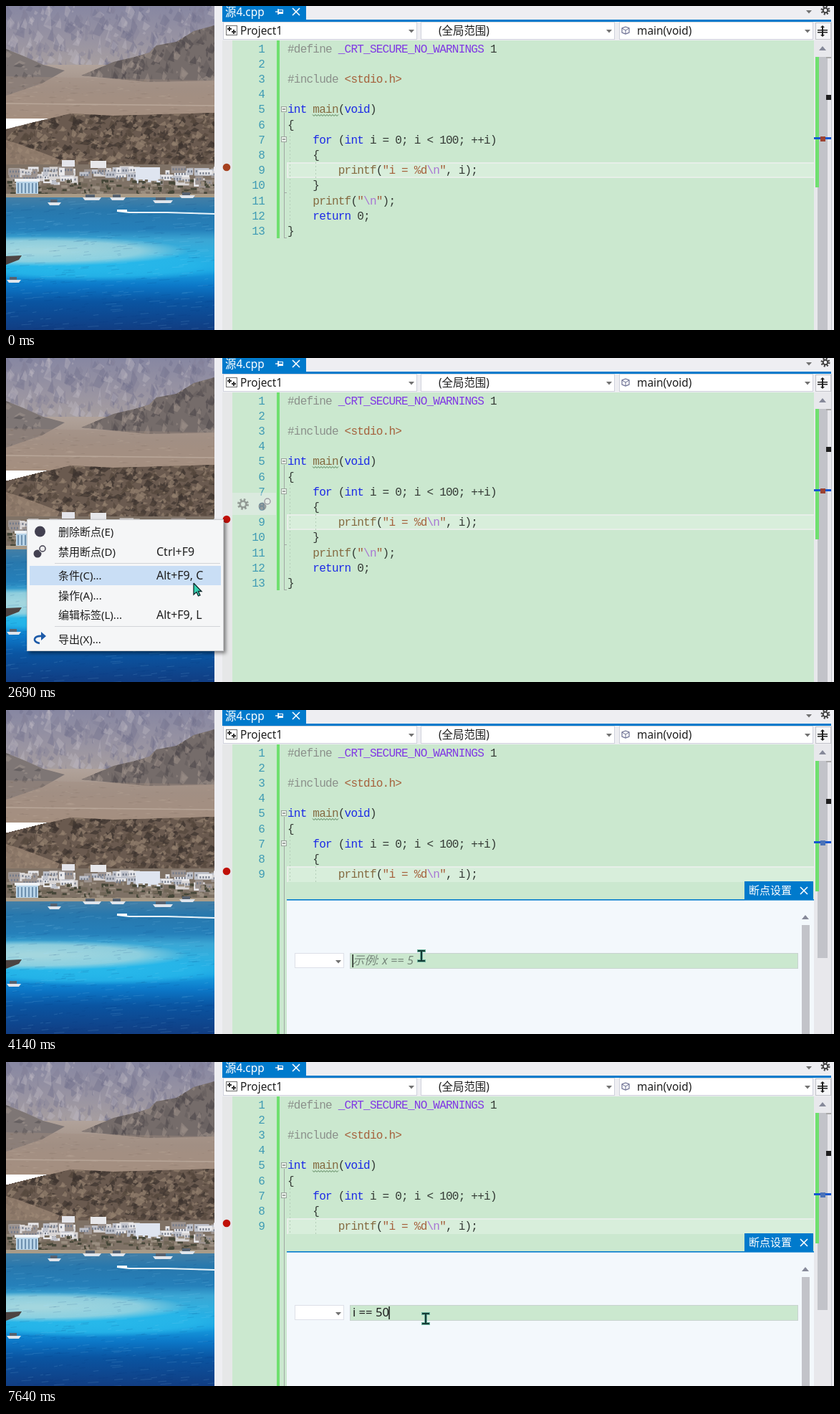
An HTML page with a canvas that plays this animation: 1156 px wide and 452 px high, repeating every 8000 ms.

```html
<!DOCTYPE html>
<html lang="zh">
<head>
<meta charset="utf-8">
<style>
html, body { margin: 0; width: 1156px; height: 452px; overflow: hidden; }
canvas { display: block; }
</style>
</head>
<body>
<canvas id="stage" width="1156" height="452"></canvas>
<script>
const stage = document.getElementById('stage');
let c = stage.getContext('2d');
const UI = '"Noto Sans", "Noto Sans CJK SC", sans-serif';
const MONO = '"Liberation Mono", monospace';
const BLUE = '#007acc', CHROME = '#eeeef2', GREEN = '#cbe8cf', LIT = '#d8eedb', INK = '#1e1e1e', THUMB = '#c2c3c9';
const GUIDE = '#b5cdb9';
const COL = 8.84, ROW = 21.2, LOOP = 8000;

const clamp = v => Math.max(0, Math.min(1, v));
function rect(x, y, w, h, fill) { c.fillStyle = fill; c.fillRect(x, y, w, h); }
function frame(x, y, w, h, stroke) { c.strokeStyle = stroke; c.lineWidth = 1; c.strokeRect(x + .5, y + .5, w - 1, h - 1); }
function dot(x, y, r, fill) { c.fillStyle = fill; c.beginPath(); c.arc(x, y, r, 0, 7); c.fill(); }
function path(points) {
  c.beginPath();
  for (let i = 0; i < points.length; i += 2) c.lineTo(points[i], points[i + 1]);
}
function poly(points, fill) { path(points); c.closePath(); c.fillStyle = fill; c.fill(); }
function line(points, stroke, width = 1, dash = []) {
  path(points);
  c.setLineDash(dash); c.strokeStyle = stroke; c.lineWidth = width; c.stroke(); c.setLineDash([]);
}
function text(str, x, middle, size = 15.4, fill = INK, style = '') {
  c.font = `${style} ${size}px ${UI}`;
  c.fillStyle = fill;
  c.fillText(str, x, middle + 5.5);
}
function down(x, y, fill = '#717171') { poly([x - 4, y - 2, x + 4, y - 2, x, y + 2.5], fill); }
function up(x, y) { poly([x - 5, y + 3, x + 5, y + 3, x, y - 3], '#868999'); }
function cross(x, y) {
  line([x - 5, y - 5, x + 5, y + 5], '#fff', 1.6);
  line([x - 5, y + 5, x + 5, y - 5], '#fff', 1.6);
}
function gear(x, y, r) {
  const ring = (radius, width, dash) => {
    c.beginPath(); c.arc(x, y, radius, 0, Math.PI * 2);
    c.setLineDash(dash); c.strokeStyle = '#424242'; c.lineWidth = width; c.stroke(); c.setLineDash([]);
  };
  ring(r, 3, [r * Math.PI / 8]);
  ring(r * .65, r * .4, []);
}
function disableIcon(x, y) {
  dot(x - 3, y + 3, 5.5, '#424050');
  dot(x + 4, y - 4, 5.5, '#f0f0f0');
  c.strokeStyle = '#424050'; c.lineWidth = 1.5;
  c.beginPath(); c.arc(x + 4, y - 4, 4, 0, 7); c.stroke();
}

// Coastal view, painted once
function paintPhoto() {
  const photo = document.createElement('canvas');
  photo.width = 291; photo.height = 452;
  const main = c;
  c = photo.getContext('2d');
  let seed = 7;
  const rnd = () => (seed = seed * 16807 % 2147483647) / 2147483647;
  const shade = (y0, y1, stops) => {
    const g = c.createLinearGradient(0, y0, 0, y1);
    stops.forEach(([y, color]) => g.addColorStop((y - y0) / (y1 - y0), color));
    return g;
  };
  // Filled outline covered with small slanted facets
  const rock = (points, fill, n, tones, steep) => {
    poly(points, fill);
    c.save(); path(points); c.clip();
    const ys = points.filter((_, i) => i % 2), top = Math.min(...ys), height = Math.max(...ys) - top;
    for (let i = 0; i < n; i++) {
      const x = rnd() * 300, y = top - 5 + rnd() * height, l = 3 + rnd() * 8, h = l * steep * (.6 + rnd());
      poly([x, y, x - l * rnd(), y + h * .8, x + l * .2, y + h, x + l * rnd(), y + h * .5], tones[i % tones.length]);
    }
    c.restore();
  };
  rock([0, 0, 291, 0, 291, 95, 0, 95], shade(0, 95, [[0, '#8787a2'], [50, '#9994a2'], [95, '#aca29f']]), 420,
    ['#6a6a8655', '#bcb6c066', '#807f9655'], 1.6);
  rect(0, 82, 291, 75, shade(82, 157, [[82, '#b1a39b'], [115, '#a29186'], [157, '#a8907f']]));
  rock([105, 97, 150, 78, 180, 71, 200, 65, 210, 55, 238, 50, 262, 35, 291, 27, 291, 104, 200, 106], '#756c6a', 380,
    ['#4b464988', '#9d918a88', '#645c5c88'], 1.4);
  rock([0, 60, 25, 70, 52, 82, 82, 90, 50, 108, 0, 125], '#7e7675', 150, ['#524d5188', '#9f958f88'], .9);
  rock([0, 98, 291, 104, 291, 157, 0, 157], '#a08d8066', 200, ['#bcaa9c55', '#83746755'], .15);
  line([0, 136, 291, 139], '#c3b3a6aa', 1.5);
  rock([0, 172, 40, 162, 90, 150, 150, 153, 291, 149, 291, 224, 0, 224], '#6a5a4f', 700,
    ['#3b322daa', '#95816faa', '#55473daa'], .8);
  poly([0, 187, 20, 193, 75, 214, 70, 224, 0, 224], '#a38c7aaa');
  rect(0, 221, 291, 47, '#7f7266');
  for (let i = 0; i < 70; i++) {
    const x = rnd() * 290, y = 223 + rnd() * 20, w = 5 + rnd() * 18, h = 5 + rnd() * 9;
    rect(x, y, w, h, ['#e9e9ec', '#bfc2cb', '#d8d5d5', '#9d9490'][i % 4]);
    for (let k = 2; k < w - 2; k += 4) rect(x + k, y + 3, 2, 3, '#747b8a');
  }
  rect(78, 215, 18, 9, '#e4e5eb'); rect(118, 216, 22, 10, '#e7e7ea'); rect(181, 225, 34, 22, '#dfe5f0');
  for (let i = 0; i < 230; i++) rect(rnd() * 291, 240 + rnd() * 23, 2 + rnd() * 7, 2 + rnd() * 3, ['#454638', '#706657', '#9a8e80'][i % 3]);
  rect(14, 243, 31, 21, '#b9d4e8'); rect(12, 241, 35, 4, '#eef2f6');
  for (let x = 16; x < 45; x += 5) rect(x, 247, 2, 14, '#6f91af');
  rect(0, 262, 291, 5, '#a99b88');

  rect(0, 267, 291, 185, shade(267, 452, [[267, '#447fa6'], [285, '#2878ad'], [312, '#2580ba'], [326, '#3ba6d4'],
    [345, '#2fb0e0'], [370, '#179ee0'], [390, '#0c78c8'], [412, '#0a55a2'], [452, '#113d82']]));
  const haze = (x, y, rx, ry, color) => {
    c.save(); c.translate(x, y); c.scale(rx, ry);
    const g = c.createRadialGradient(0, 0, .1, 0, 0, 1);
    g.addColorStop(0, color); g.addColorStop(.65, color + 'cc'); g.addColorStop(1, color + '00');
    dot(0, 0, 1, g); c.restore();
  };
  haze(120, 362, 210, 22, '#27b8ea');
  haze(40, 342, 215, 21, '#a3d6de');
  for (let i = 0; i < 420; i++) {
    const x = rnd() * 300, y = 268 + rnd() * 184;
    line([x, y, x - 4 - rnd() * 12, y + 1], i % 2 ? '#06337022' : '#a2dcff22');
  }
  line([155, 286, 172, 288, 225, 288, 291, 290], '#e9f4fa', 1.8);
  rect(155, 284, 14, 3, '#fff');
  const boat = (x, y, w) => { poly([x, y, x + w, y, x + w - 3, y + 4, x + 3, y + 4], '#dfe5ec'); rect(x + 4, y - 4, w / 2, 4, '#56616f'); };
  boat(58, 274, 19); boat(107, 267, 26); boat(145, 267, 22); boat(205, 271, 28); boat(242, 264, 22); boat(1, 382, 20);
  poly([0, 349, 22, 348, 18, 354, 0, 361], '#4d4442');
  c = main;
  return photo;
}
const photo = paintPhoto();

const TONE = { g: '#8b908b', m: '#8038e4', k: '#1c2ae6', f: '#846a40', s: '#a5613c', e: '#a876d4', t: '#343a35' };
const CODE = [
  'g#define |m_CRT_SECURE_NO_WARNINGS|t 1', '', 'g#include |s<stdio.h>', '',
  'kint |fmain|t(|kvoid|t)', 't{',
  't    |kfor|t (|kint|t i = 0; i < 100; ++i)', 't    {',
  't        |fprintf|t(|s"i = %d|e\\n|s"|t, i);', 't    }',
  't    |fprintf|t(|s"|e\\n|s"|t);', 't    |kreturn|t 0;', 't}'
];

function drawCode(count) {
  c.font = `16px ${MONO}`;
  c.letterSpacing = COL - c.measureText('0').width + 'px';
  for (let row = 0; row < count; row++) {
    const y = 64.5 + row * ROW, label = String(row + 1);
    c.fillStyle = '#3f9bb4';
    c.fillText(label, 361 - label.length * COL, y);
    let col = 0;
    for (const token of CODE[row].split('|')) {
      c.fillStyle = TONE[token[0]];
      c.fillText(token.slice(1), 393 + col * COL, y);
      col += Math.max(0, token.length - 1);
    }
  }
  c.letterSpacing = '0px';
}

function drawChrome() {
  rect(291, 0, 865, 452, CHROME);
  c.drawImage(photo, 0, 0);
  rect(302, 0, 117, 20, BLUE);
  rect(302, 19, 850, 3, BLUE);
  text('源4.cpp', 306, 8, 15.4, '#fff');
  line([376, 8, 380, 8], '#fff', 1.3); line([380, 4, 380, 12], '#fff', 1.5);
  frame(380, 5, 7, 6, '#fff'); rect(381, 8, 5, 2, '#fff');
  cross(405, 8);
  down(1121, 8); gear(1144, 6, 5);
  [[303, 'Project1', 327], [579, '(全局范围)', 604], [856, 'main(void)', 881]].forEach(([x, label, tx]) => {
    rect(x, 22, 271, 25, '#fff'); frame(x, 22, 271, 25, '#d0d2dc');
    down(x + 263, 35);
    text(label, tx, 34.5);
  });
  frame(307, 27, 16, 14, '#6d6d6d');
  for (const [x, y] of [[312, 32], [318, 36]]) { rect(x - 3, y - 1, 6, 2, '#333'); rect(x - 1, y - 3, 2, 6, '#333'); }
  line([865, 29, 870, 31, 870, 37, 865, 39, 860, 37, 860, 31, 865, 29], '#6b6f92', 1.2);
  line([860, 31, 865, 34, 870, 31], '#6b6f92'); line([865, 34, 865, 39], '#6b6f92');
  rect(1130, 23, 22, 24, '#f6f6f8'); frame(1130, 23, 22, 24, THUMB);
  rect(1133, 33, 14, 1.5, INK); rect(1133, 36, 14, 1.5, INK);
  rect(1139, 28, 2, 14, INK); poly([1137, 30, 1143, 30, 1140, 27], INK); poly([1137, 40, 1143, 40, 1140, 43], INK);
}

function drawEditor(t, open) {
  rect(302, 48, 14, 404, '#e6e7e8');
  rect(316, 48, 812, 404, GREEN);
  rect(392, 218, 736, 22, '#e7efe8');
  rect(394, 220, 734, open ? 20 : 18, LIT);
  const end = open ? 452 : 324;
  rect(378, 48, 4, end - 48, '#6fe06f');
  line([388.5, 149, 388.5, end], '#a0a8a2');
  if (!open) { line([388, 260.5, 392, 260.5], '#a0a8a2'); line([388, 323.5, 392, 323.5], '#a0a8a2'); }
  for (const y of [140, 182]) {
    rect(384, y, 8, 8, '#eaf3eb'); frame(384, y, 8, 8, '#9aa39c');
    rect(386, y + 3.5, 4, 1, '#555');
  }
  line([396.5, 176, 396.5, open ? 240 : 304], GUIDE, 1, [2, 3]);
  line([432.5, 218, 432.5, 240], GUIDE, 1, [2, 3]);
  drawCode(open ? 9 : 13);
  const wave = [];
  for (let x = 428; x <= 464; x += 2) wave.push(x, x % 4 ? 153.5 : 151.5);
  line(wave, '#4f7a4f');
  dot(308, 225, 5.3, t < 1120 ? '#a6411f' : '#c01008');

  rect(1128, 48, 24, 404, '#e8e8ec');
  up(1140, 59);
  rect(1133, 71, 14, open ? 275 : 381, THUMB);
  rect(1130, 71, 5, 182, '#6fe06f');
  rect(1128, 183, 24, 3, '#1456d0');
  rect(1137, 182, 7, 7, t < 3730 ? '#9c4232' : '#4a72b8');
  rect(1145, 124, 7, 7, INK); rect(1145, 71, 7, 2, '#a9a9a9');
  line([1152.5, 22, 1152.5, 452], THUMB);
}

const TYPED = [[5570, 'i'], [5900, 'i '], [6100, 'i ='], [6230, 'i =='], [6500, 'i == '], [7510, 'i == 5'], [7640, 'i == 50']];

function drawPanel(t) {
  const bottom = t < 3660 ? 374 : t < 3730 ? 425 : 452;
  rect(392, bottom, 736, 452 - bottom, LIT);
  for (const x of [396.5, 432.5]) line([x, bottom, x, 452], GUIDE, 1, [2, 3]);
  rect(392, 264, 736, bottom - 264, '#f3f8fc');
  rect(392, 264, 736, 1.6, BLUE);
  rect(1031, 239, 96, 25, BLUE);
  text('断点设置', 1037, 251, 15, '#fff');
  cross(1114, 252);
  up(1116, 289);
  rect(1111, 300, 11, bottom - 300, THUMB);
  rect(403, 339, 69, 21, '#fff'); frame(403, 339, 69, 21, '#dde0e8'); down(464, 351);
  rect(480, 339, 626, 22, GREEN); frame(480, 339, 626, 22, '#c8d3cf');

  const typed = TYPED.filter(([at]) => t >= at).pop();
  const size = 16.6;
  if (typed) text(typed[1], 484, 349.5, size);
  else text('示例: x == 5', 484, 349.5, 16.3, '#76867a', 'italic');
  const hidden = t >= 4310 && t < 4840 || t >= 5370 && t < 5570 || t >= 6980 && t < 7510;
  if (hidden) return;
  c.font = `${size}px ${UI}`;
  rect(483.5 + (typed ? c.measureText(typed[1]).width : 0), 341, 1.3, 18, '#000');
}

const MENU = [
  [242, '删除断点(E)'], [270, '禁用断点(D)', 'Ctrl+F9'], [303, '条件(C)...', 'Alt+F9, C'],
  [331, '操作(A)...'], [358, '编辑标签(L)...', 'Alt+F9, L'], [392, '导出(X)...']
];

function drawMenu(t, [px, py]) {
  c.save();
  c.globalAlpha = t < 2970 ? clamp((t - 1520) / 210) : clamp((3320 - t) / 420);
  c.shadowColor = '#0007'; c.shadowBlur = 5; c.shadowOffsetX = c.shadowOffsetY = 3;
  rect(29, 225, 275, 184, '#f5f6f7');
  c.shadowColor = 'transparent';
  frame(29, 225, 275, 184, '#c9cacd');
  for (const [y, label, keys] of MENU) {
    if (px < 302 && Math.abs(py - y) < 13.5) rect(33, y - 13, 267, 27, '#c9def5');
    text(label, 73, y, 15);
    if (keys) text(keys, 210, y, 16);
  }
  for (const y of [286, 374]) rect(68, y, 231, 1, '#d2d4d8');
  dot(47.5, 242, 7.5, '#424050');
  disableIcon(47, 270);
  c.strokeStyle = '#1c5aa8'; c.lineWidth = 2.6;
  c.beginPath(); c.moveTo(47, 398); c.bezierCurveTo(36, 396, 38, 387, 51, 388); c.stroke();
  poly([49, 382, 56, 388, 49, 394], '#1c5aa8');
  c.restore();
}

function drawToolbar(t) {
  c.save();
  c.globalAlpha = t < 2970 ? 1 - .55 * clamp((t - 2120) / 570) : .45 * clamp((3110 - t) / 210);
  rect(316, 188, 61, 31, '#ececef');
  gear(331, 204, 6.5);
  disableIcon(361, 204);
  c.restore();
}

function drawTooltip() {
  rect(64, 242, 240, 22, '#f6f6f8'); frame(64, 242, 240, 22, THUMB);
  text('位置: 源4.cpp, 第 9 行, main(void)', 69, 253, 14.5);
}

const MOVES = [
  [70, 1014, 438], [840, 318, 241], [1120, 310, 225], [2120, 310, 225], [2690, 262, 314], [3860, 262, 314],
  [4140, 580, 343], [4420, 586, 358], [4700, 586, 358], [4770, 594, 363], [4840, 586, 358], [LOOP, 586, 358]
];

// The pointer advances in 70 ms ticks
function pointerAt(t) {
  const i = Math.max(1, MOVES.findIndex(m => m[0] > t));
  const [t0, x0, y0] = MOVES[i - 1], [t1, x1, y1] = MOVES[i];
  const k = clamp(Math.floor((t - t0) / 70) * 70 / (t1 - t0)), e = 1 - (1 - k) ** 2;
  return [x0 + (x1 - x0) * e, y0 + (y1 - y0) * e];
}

function drawPointer(t, [x, y]) {
  c.save();
  c.translate(x, y);
  if (t > 3930 && x > 480) {
    for (const [grow, color] of [[1, '#6fb5a0'], [0, '#173c36']]) {
      rect(-5 - grow, -8 - grow, 10 + 2 * grow, 2 + 2 * grow, color);
      rect(-5 - grow, 6 - grow, 10 + 2 * grow, 2 + 2 * grow, color);
      rect(-1 - grow, -7, 2 + 2 * grow, 14, color);
    }
  } else {
    const arrow = [0, 0, 0, 16, 4, 12.5, 6.5, 18, 9, 17, 6.5, 11.5, 11, 11.5, 0, 0];
    poly(arrow, '#36d2b2');
    line(arrow, '#10282c', 1.3);
  }
  c.restore();
}

function draw() {
  const t = performance.now() % LOOP, open = t >= 3590, pointer = pointerAt(t);
  drawChrome();
  drawEditor(t, open);
  if (open) drawPanel(t);
  if (t >= 1320 && t < 3110) drawToolbar(t);
  if (t >= 1320 && t < 1590) drawTooltip();
  if (t >= 1590 && t < 3320) drawMenu(t, pointer);
  if (t >= 70) drawPointer(t, pointer);
  requestAnimationFrame(draw);
}
draw();
</script>
</body>
</html>
```
